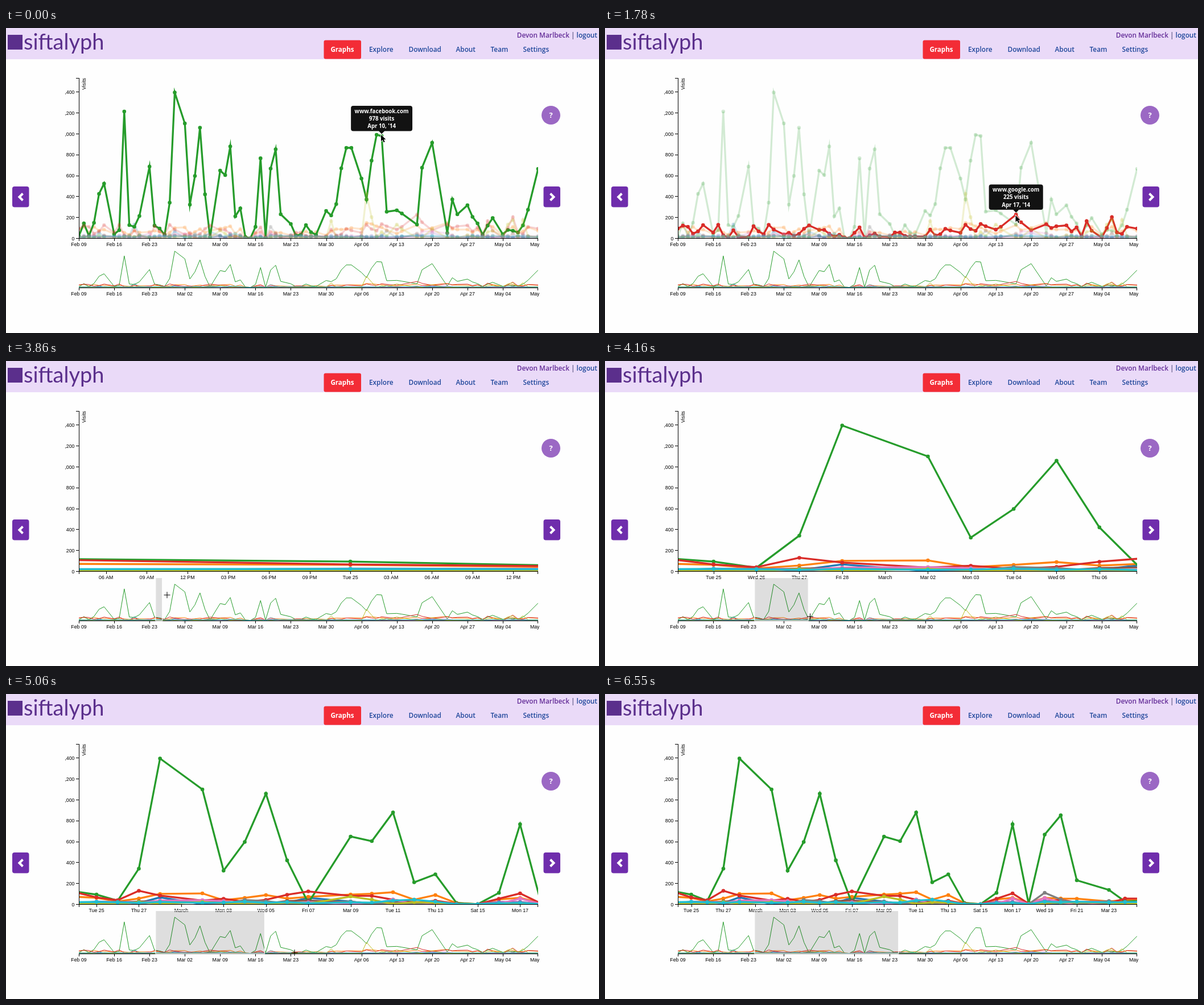
An HTML page with a canvas for the animation above (7620 ms loop, 1042 px wide and 537 px high).

```html
<!DOCTYPE html>
<html lang="en">
<head>
<meta charset="utf-8">
<title>Visits graph</title>
<style>
html, body { margin: 0; width: 100%; height: 100%; overflow: hidden; background: #fefefe; }
svg, canvas { position: absolute; left: 0; top: 0; }
text { font: 600 11.8px "Open Sans", sans-serif; fill: #1f479b; }
</style>
</head>
<body>
<svg width="1042" height="537">
  <rect width="1042" height="55" fill="#eadaf8"/>
  <rect x="3" y="12" width="26" height="26" fill="#5b2f8c"/>
  <text x="31" y="38" style="font:400 38px Lato,sans-serif;fill:#5b2f8c">siftalyph</text>
  <text x="1039" y="17" text-anchor="end"><tspan fill="#642d98">Devon Marlbeck</tspan><tspan fill="#54507c"> | </tspan>logout</text>
  <rect x="558.5" y="21.5" width="65.5" height="33" rx="3" fill="#f32c36"/>
  <text x="591" y="42" text-anchor="middle" style="fill:#fff;font-weight:700;font-size:11.6px">Graphs</text>
  <text x="638" y="42">Explore</text>
  <text x="707.5" y="42">Download</text>
  <text x="790.5" y="42">About</text>
  <text x="851.5" y="42">Team</text>
  <text x="908.5" y="42">Settings</text>
  <circle cx="957.5" cy="153.5" r="16.5" fill="#9b68c4"/>
  <text x="957.5" y="158" text-anchor="middle" style="fill:#fff;font-weight:700;font-size:13px">?</text>
  <g fill="#6f2dac">
    <rect x="11" y="279" width="29.5" height="36.5" rx="4"/>
    <rect x="944.5" y="279" width="29.5" height="36.5" rx="4"/>
  </g>
  <path d="M29.5 291.5l-6 6 6 6M956.5 291.5l6 6-6 6" fill="none" stroke="#fff" stroke-width="4"/>
</svg>
<canvas id="stage" width="1042" height="537"></canvas>
<script>
const ctx = document.getElementById('stage').getContext('2d');
const LOOP = 7620, LEFT = 128, RIGHT = 935, WIDTH = RIGHT - LEFT, SPAN = 91;
const MAIN = { base: 370, scale: 0.184 }, OVERVIEW = { base: 456.5, scale: 0.0456 };
const BRUSH_START = 262.5;
const GREEN = 2, RED = 3;
const colors = ['#1f77b4', '#ff800e', '#269c2b', '#d92c28', '#9467bd',
                '#8c564b', '#e377c2', '#7f7f7f', '#bcbd22', '#1fbfd0'];

// Days since Feb 9; most Saturdays and four other days have no record.
const days = [];
for (let d = 0; d <= SPAN; d++)
  if ((d % 7 !== 6 || d === 34) && ![65, 66, 71, 72].includes(d)) days.push(d);

const full = {
  1: [82,109,54,109,71,82, 43,76,54,33,71,54, 60,71,60,27,54,98, 103,38,60,87,54,70,
      92,100,114,43,87,11,0, 45,60,11,60,54,52, 27,40,38,65,38,60, 27,65,87,82,87,98,
      87,147,136,114,103,76, 43,65,125,76, 98,147,87,82, 82,54,82,43,130,109,
      27,76,109,54,65,103, 71],
  2: [20,141,22,147,424,522, 38,76,1212,125,109,212, 685,120,92,33,340,1394,
      1098,321,595,1057,419,11, 647,603,878,209,285,11,0, 108,764,5,666,850,228,
      136,25,33,125,57,33, 261,217,326,668,864,864, 571,370,742,989,978,253,
      266,236,130,674, 913,49,370,228, 315,204,141,33,120,193, 38,79,71,54,122,272, 663],
  3: [92,120,109,43,65,125, 54,128,27,5,76,11, 11,114,65,38,128,82, 35,52,22,41,90,122,
      79,79,43,16,33,5,0, 52,103,5,27,43,16, 11,54,54,22,16,16, 16,82,27,38,90,73,
      52,128,87,71,136,114, 82,109,225,152, 76,133,98,114, 122,65,103,16,163,71,
      5,98,201,54,41,109, 92]
};
// Small series: low noise with a few known peaks, day: visits.
const peaks = {
  0: { 4: 55, 11: 130, 12: 30, 19: 65, 26: 60, 28: 25 },
  4: { 70: 50, 38: 35 },
  5: { 18: 27, 25: 30, 26: 35, 67: 45, 86: 48 },
  6: { 14: 50, 19: 35, 21: 38, 30: 45, 36: 54, 38: 60, 68: 65, 70: 65, 73: 45 },
  7: { 23: 40, 38: 109, 39: 45, 61: 70 },
  8: { 28: 73, 29: 43, 50: 163, 57: 424, 58: 201, 60: 60, 63: 130, 64: 87, 70: 90,
       81: 60, 82: 70, 85: 130, 86: 174, 88: 174 },
  9: { 31: 43, 32: 24, 30: 35 }
};
const rand = (a, b) => { const v = Math.sin(a * 12.99 + b * 78.23) * 43758.5; return v - Math.floor(v); };
const noise = (s, d) => [33, 34, 37].includes(d) ? 0
  : s === 9 ? 8 + 16 * rand(d, s) : 30 * rand(d, s) ** 2;
const series = colors.map((_, s) => full[s] || days.map(d => peaks[s][d] ?? noise(s, d)));

// [ms, cursor x, cursor y, focus series, focus strength, brush end]
const steps = [
  [0, 659, 188, GREEN, 1], [150, 672, 197, GREEN, .66], [300, 690, 212, GREEN, .33],
  [450, 712, 227], [600, 728, 237], [740, 730, 250], [890, 728, 262],
  [1190, 727, 276], [1340, 725, 302], [1480, 723, 322, RED, .33],
  [1630, 722, 330, RED, .66], [1780, 721.5, 330, RED, 1],
  [2370, 690, 340, RED, .5], [2520, 560, 364], [2670, 380, 386], [2820, 257.5, 396.5],
  [3120, 259, 394], [3270, 261, 391], [3420, 262.5, 388], [3570, 262.5, 387.5],
  [3860, 283, 412, 0, 0, 275], [4010, 330, 436, 0, 0, 320], [4160, 360.5, 450, 0, 0, 357.5],
  [4310, 372, 452, 0, 0, 368], [4460, 395, 453, 0, 0, 390], [4610, 418, 453, 0, 0, 412],
  [4760, 442, 454, 0, 0, 434], [5060, 507, 455.5, 0, 0, 454.8], [5210, 514, 456, 0, 0, 508],
  [5500, 516, 456, 0, 0, 516], [6100, 515.5, 457.5, 0, 0, 516], [6550, -50, 0, 0, 0, 516]
];

const tickSteps = [1 / 24, 1 / 8, 1 / 4, 1 / 2, 1, 2, 7];
const dateOf = d => new Date(Date.UTC(2014, 1, 9) + Math.round(d * 24) * 3600000);
const part = (date, options) => date.toLocaleString('en-US', { timeZone: 'UTC', ...options });
const pad = n => String(n).padStart(2, '0');

function tickLabel(d) {
  const date = dateOf(d), hour = date.getUTCHours(), n = date.getUTCDate();
  if (hour) return pad(hour % 12 || 12) + (hour < 12 ? ' AM' : ' PM');
  if (n === 1) return part(date, { month: 'long' });
  return part(date, date.getUTCDay() ? { weekday: 'short' } : { month: 'short' }) + ' ' + pad(n);
}

function ticks(from, to) {
  const off = s => Math.abs(Math.log(s * 10 / (to - from)));
  const step = tickSteps.reduce((a, b) => off(b) < off(a) ? b : a);
  const list = [], unit = step === 2 ? 1 : step;
  for (let k = Math.ceil(from / unit - 1e-6); k * unit <= to + 1e-6; k++)
    if (step !== 2 || dateOf(k).getUTCDate() % 2) list.push(k * unit);
  return list;
}

function clip(x, y, w, h, draw) {
  ctx.save();
  ctx.beginPath();
  ctx.rect(x, y, w, h);
  ctx.clip();
  draw();
  ctx.restore();
}

function label(text, x, y, align) {
  ctx.font = '8.8px "Liberation Sans", Arial, sans-serif';
  ctx.fillStyle = '#000';
  ctx.textAlign = align;
  ctx.fillText(text, x, y);
}

const bar = (x, y, w, h) => { ctx.fillStyle = '#000'; ctx.fillRect(x, y, w, h); };

function trace(values, xOf, { base, scale }) {
  ctx.beginPath();
  days.forEach((d, i) => ctx.lineTo(xOf(d), base - values[i] * scale));
  ctx.stroke();
}

function xAxis(y, from, to, xOf) {
  bar(LEFT, y, WIDTH, 1);
  bar(LEFT, y, 1, 5);
  bar(RIGHT - 1, y, 1, 5);
  clip(103, y, 834, 30, () => {
    for (const d of ticks(from, to)) {
      bar(Math.min(Math.round(xOf(d)), RIGHT - 1), y, 1, 5);
      label(tickLabel(d), xOf(d), y + 14, 'center');
    }
  });
}

function yAxis() {
  bar(LEFT, 88, 1, 283);
  bar(123, 88, 5, 1);
  clip(103.5, 80, 40, 300, () => {
    for (let v = 0; v <= 1400; v += 200) {
      const y = MAIN.base - v * MAIN.scale;
      bar(123, Math.round(y), 5, 1);
      label(v.toLocaleString('en-US'), 120.5, y + 3.5, 'right');
    }
    ctx.translate(139.5, 88);
    ctx.rotate(-Math.PI / 2);
    label('Visits', 0, 0, 'right');
  });
}

function mainChart(xOf, focus, strength) {
  clip(LEFT, 88, WIDTH, 283, () => series.forEach((values, s) => {
    ctx.globalAlpha = s === focus ? 1 : 1 - .8 * strength;
    ctx.strokeStyle = ctx.fillStyle = colors[s];
    ctx.lineWidth = 3.3;
    ctx.lineJoin = 'miter';
    trace(values, xOf, MAIN);
    days.forEach((d, i) => {
      ctx.beginPath();
      ctx.arc(xOf(d), MAIN.base - values[i] * MAIN.scale, 3.3, 0, 7);
      ctx.fill();
    });
  }));
}

function overview(xOf) {
  clip(LEFT, 385, WIDTH, 72.5, () => series.forEach((values, s) => {
    ctx.strokeStyle = colors[s];
    ctx.lineWidth = 1;
    trace(values, xOf, OVERVIEW);
  }));
}

function brush(end) {
  const w = end - BRUSH_START;
  ctx.fillStyle = 'rgba(0,0,0,.125)';
  ctx.fillRect(BRUSH_START, 381.5, w, 75);
  ctx.strokeStyle = '#fff';
  ctx.lineWidth = 1.2;
  ctx.strokeRect(BRUSH_START + .3, 381.5, w - .6, 75.5);
}

function tooltip(focus, alpha, xOf) {
  const [site, day] = focus === GREEN ? ['www.facebook.com', 60] : ['www.google.com', 67];
  const visits = series[focus][days.indexOf(day)], date = dateOf(day);
  const lines = [site, visits + ' visits', part(date, { month: 'short' }) + ' ' + date.getUTCDate() + ", '14"];
  const x = xOf(day), bottom = MAIN.base - visits * MAIN.scale - 8.5;
  ctx.font = '700 9.7px "Open Sans", sans-serif';
  const w = ctx.measureText(site).width + 13;
  ctx.globalAlpha = alpha;
  ctx.fillStyle = '#121212';
  ctx.beginPath();
  ctx.roundRect(x - w / 2, bottom - 44.5, w, 44.5, 4);
  ctx.moveTo(x - 5, bottom);
  ctx.lineTo(x + 5, bottom);
  ctx.lineTo(x, bottom + 5);
  ctx.fill();
  ctx.fillStyle = '#fff';
  ctx.textAlign = 'center';
  lines.forEach((line, i) => ctx.fillText(line, x, bottom - 32 + i * 13.2));
  ctx.globalAlpha = 1;
}

const shapes = {
  arrow: new Path2D('M0 0V11.5L2.7 9 4.6 13.3 6.7 12.4 4.8 8.2H8.4Z'),
  cross: new Path2D('M-5.5-.5H-.5V-5.5H.5V-.5H5.5V.5H.5V5.5H-.5V.5H-5.5Z'),
  resize: new Path2D('M-7 0L-3-4V-1H3V-4L7 0 3 4V1H-3V4Z')
};

function cursor(x, y, t) {
  const kind = t >= 6100 ? 'resize' : y > 380 ? 'cross' : 'arrow';
  ctx.save();
  ctx.translate(x, y);
  if (kind !== 'cross') {
    ctx.strokeStyle = '#fff';
    ctx.lineWidth = 1.6;
    ctx.stroke(shapes[kind]);
  }
  ctx.fillStyle = '#000';
  ctx.fill(shapes[kind]);
  ctx.restore();
}

function frame(now) {
  const t = now % LOOP;
  const [, x, y, focus = 0, strength = 0, end] = steps.findLast(s => s[0] <= t);
  const allX = d => LEFT + d * WIDTH / SPAN;
  const dayAt = px => (px - LEFT) * SPAN / WIDTH;
  const from = end ? dayAt(BRUSH_START) : 0, to = end ? dayAt(end) : SPAN;
  const zoomX = d => LEFT + (d - from) * WIDTH / (to - from);

  ctx.clearRect(0, 0, 1042, 537);
  mainChart(zoomX, focus, strength);
  xAxis(370, from, to, zoomX);
  yAxis();
  overview(allX);
  xAxis(457, 0, SPAN, allX);
  if (end) brush(end);
  if (strength) tooltip(focus, strength, zoomX);
  cursor(x, y, t);
}

const start = performance.now();
(function loop() {
  frame(performance.now() - start);
  requestAnimationFrame(loop);
})();
</script>
</body>
</html>
```
